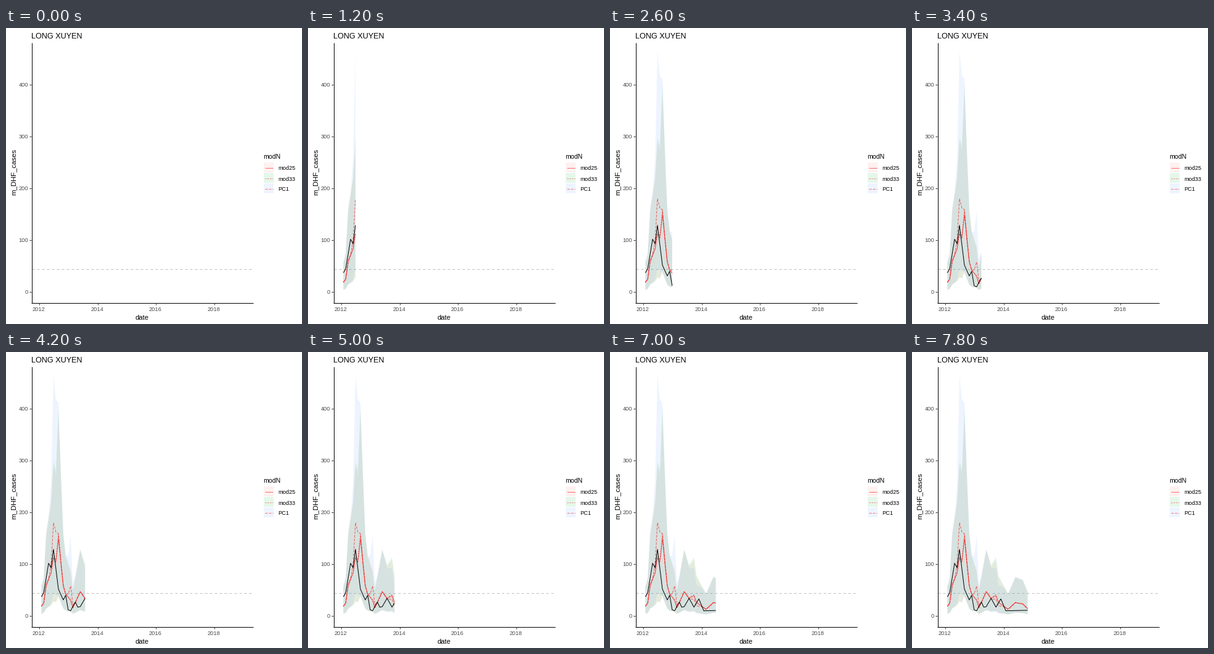
Write a matplotlib script that moves like this. It is 480 by 480 pixels and loops after 8 s.

```python
import numpy as np
import matplotlib.pyplot as plt
from matplotlib.animation import FuncAnimation
from matplotlib.patches import Rectangle

SIZE, DPI = 480, 100
PX = 72 / DPI                      # one pixel in points
FRAMES, INTERVAL = 40, 200
FULL_STEPS, FULL_DAYS = 99, 2526   # the whole reveal, Feb 2012 to Jan 2019
PINK, GREEN, BLUE = "#F8766D", "#00BA38", "#619CFF"
SOLID, SHORT, LONG, EVEN = "-", (0, (2, 2)), (0, (4, 2)), (0, (4, 4))

plt.rcParams["font.family"] = "Liberation Sans"

START = np.datetime64("2012-02-01")
step = np.arange(34)               # months since the start


def days_since(dates):
    return (dates.astype("datetime64[D]") - START).astype(int)


def through(*points):
    """Monthly values on straight lines between (month, value) points."""
    return np.interp(step, *zip(*points))


def bell(centre, width):
    return np.exp(-((step - centre) / width) ** 2)


def top(line):
    return 2.52 * line + 12


def low(line):
    return np.maximum(0.25 * line - 1, 1)


cases = through((0, 36), (1, 44), (3, 101), (4, 92), (5, 128), (7, 51), (9, 30),
                (10, 39), (11, 11), (12, 9), (14, 26), (15, 16), (16, 17),
                (18, 33), (20, 16), (22, 32), (24, 9), (33, 10))
mod25 = through((0, 18), (1, 24), (2, 59), (4, 82), (5, 111), (6, 103), (7, 149),
                (9, 57), (10, 41), (12, 30), (13, 15), (16, 46), (18, 33),
                (20, 38), (21, 25), (25, 12), (28, 25), (31, 22), (33, 13))
mod33 = mod25 * (1 + 0.05 * np.sin(0.5 * step - 2))
pc1 = mod25 + 78 * bell(5.4, 1.1) + 27 * bell(12, 0.8) - 7 * bell(20.5, 2)

days = days_since(START.astype("datetime64[M]") + step)
shown_at = np.round(FULL_STEPS * days / FULL_DAYS)


def px(day):
    return 57.4 + day * 327.3 / FULL_DAYS


def py(value):
    return 427.2 - 0.8385 * np.asarray(value)


fig = plt.figure(figsize=(SIZE / DPI, SIZE / DPI), dpi=DPI, facecolor="white")
ax = fig.add_axes([0, 0, 1, 1])
ax.set_xlim(0, SIZE)
ax.set_ylim(SIZE, 0)
ax.axis("off")


def stroke(xs, ys, color, style=SOLID, alpha=1, z=3):
    return ax.plot(xs, ys, color=color, ls=style, lw=PX, alpha=alpha,
                   solid_capstyle="butt", dash_capstyle="butt", zorder=z)[0]


def label(x, y, text, size, color="black", **kw):
    kw.setdefault("va", "baseline")
    ax.text(x, y, text, fontsize=size * PX, color=color, **kw)


def ribbon(color):
    return ax.fill([57, 57, 57], [427, 427, 427], color=color, alpha=0.1,
                   lw=0, zorder=2)[0]


# Axes
stroke([41.5, 41.5], [24, 446], "black")
stroke([41, 401], [445.5, 445.5], "black")
for value in range(0, 401, 100):
    y = np.floor(py(value)) + 0.5
    stroke([38, 41], [y, y], "#333333")
    label(36, y + 3.2, str(value), 9.3, "#4D4D4D", ha="right")
for year in range(2012, 2019, 2):
    x = np.floor(px(days_since(np.datetime64(f"{year}-01-01")))) + 0.5
    stroke([x, x], [446, 449], "#333333")
    label(x - 0.5, 459, str(year), 9.3, "#4D4D4D", ha="center")
stroke([42, 401], [390.5, 390.5], "#BEBEBE", EVEN, z=1)

label(41, 17, "LONG XUYEN", 12.6)
label(220.5, 473, "date", 11.2, ha="center")
label(12, 233, "m_DHF_cases", 11.4, rotation=90, ha="center", va="center")

# Legend
label(417.5, 212, "modN", 10.5)
models = [("mod25", PINK, SOLID, mod25),
          ("mod33", GREEN, SHORT, mod33),
          ("PC1", BLUE, LONG, pc1)]
bands, lines = [], []
for k, (name, color, style, values) in enumerate(models):
    y = 226.5 + 17 * k
    ax.add_patch(Rectangle((418, y - 8.5), 16, 16, color=color, alpha=0.1, lw=0))
    stroke([420, 433], [y, y], "red", style, 0.55)
    label(441, y + 4, name, 9.1)
    bands.append((ribbon(color), top(values), low(values)))
    lines.append((stroke([], [], "red", style, 0.6, 4), values))
lines.append((stroke([], [], "black", z=5), cases))


def reveal(values, frame):
    """Values up to the frame, with an in-between point at its end."""
    seen = values[shown_at < frame]
    return np.append(seen, np.interp(frame, shown_at, values))


def draw(frame):
    xs = px(reveal(days, frame))
    for band, upper, lower in bands:
        ys = py(np.append(reveal(upper, frame), reveal(lower, frame)[::-1]))
        band.set_xy(np.column_stack([np.append(xs, xs[::-1]), ys]))
        band.set_visible(frame > 0)
    for line, values in lines:
        line.set_data(xs, py(reveal(values, frame)))
        line.set_visible(frame > 0)
    return [part[0] for part in bands + lines]


anim = FuncAnimation(fig, draw, frames=FRAMES, interval=INTERVAL,
                     repeat=True, repeat_delay=0, blit=False)
plt.show()
```
